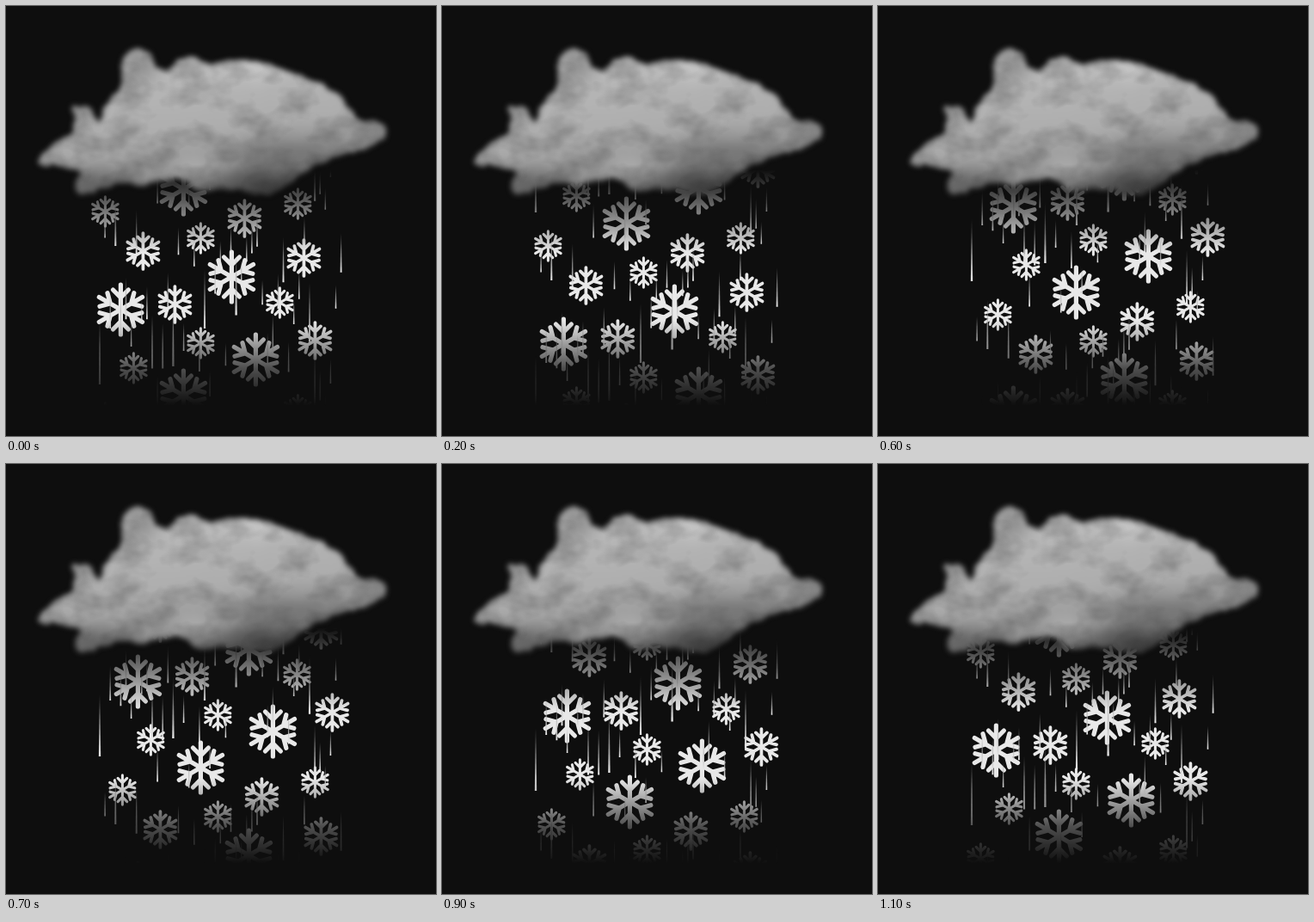
Write an HTML page that moves like this. It is 500 px wide and 500 px high and loops after 1200 ms.

```html
<!DOCTYPE html>
<html lang="en">
<head>
<meta charset="utf-8">
<title>Snow cloud</title>
<style>
html, body { margin: 0; width: 100%; height: 100%; overflow: hidden; background: #0e0e0e; }
svg { display: block; width: 500px; height: 500px; }
</style>
</head>
<body>
<svg viewBox="0 0 500 500">
  <defs>
    <linearGradient id="fade" gradientUnits="userSpaceOnUse" x1="0" y1="190" x2="0" y2="465">
      <stop offset="0" stop-color="#fff" stop-opacity="0"/>
      <stop offset=".1" stop-color="#fff" stop-opacity=".26"/>
      <stop offset=".35" stop-color="#fff"/>
      <stop offset=".64" stop-color="#fff"/>
      <stop offset=".84" stop-color="#fff" stop-opacity=".3"/>
      <stop offset="1" stop-color="#fff" stop-opacity="0"/>
    </linearGradient>
    <mask id="window" maskUnits="userSpaceOnUse" x="0" y="0" width="500" height="500">
      <rect y="190" width="500" height="275" fill="url(#fade)"/>
    </mask>
    <linearGradient id="streak" x1="0" y1="0" x2="0" y2="1">
      <stop offset="0" stop-color="#999" stop-opacity="0"/>
      <stop offset=".4" stop-color="#aaa" stop-opacity=".65"/>
      <stop offset="1" stop-color="#eee"/>
    </linearGradient>
    <linearGradient id="shade" gradientUnits="userSpaceOnUse" x1="235" y1="60" x2="255" y2="222">
      <stop offset="0" stop-color="#bababa"/>
      <stop offset=".5" stop-color="#adadad"/>
      <stop offset=".78" stop-color="#929292"/>
      <stop offset="1" stop-color="#4c4c4c"/>
    </linearGradient>
    <path id="arm" d="M0 0V-29M-9-23L0-14L9-23"/>
    <g id="flake" fill="none" stroke="#e8e8e8" stroke-width="5.2" stroke-linecap="round"></g>
    <filter id="soft" x="-60%" y="-60%" width="220%" height="220%">
      <feGaussianBlur stdDeviation="9"/>
    </filter>
    <filter id="wisp" filterUnits="userSpaceOnUse" x="10" y="30" width="460" height="220" color-interpolation-filters="sRGB">
      <feTurbulence type="fractalNoise" baseFrequency=".06" numOctaves="3" seed="4" result="noise"/>
      <feDisplacementMap in="SourceGraphic" in2="noise" scale="10" xChannelSelector="R" yChannelSelector="G"/>
      <feGaussianBlur stdDeviation="3" result="body"/>
      <feTurbulence type="fractalNoise" baseFrequency=".025 .035" numOctaves="3" seed="9"/>
      <feColorMatrix values="0 0 0 0 .05  0 0 0 0 .05  0 0 0 0 .05  .5 0 0 0 -.2"/>
      <feComposite in2="body" operator="in" result="grain"/>
      <feMerge><feMergeNode in="body"/><feMergeNode in="grain"/></feMerge>
    </filter>
    <clipPath id="outline"><path id="edge"/></clipPath>
  </defs>
  <g mask="url(#window)">
    <g id="snow"></g>
    <g id="rain" fill="url(#streak)"></g>
  </g>
  <g filter="url(#wisp)">
    <g id="cloud" clip-path="url(#outline)">
      <rect width="500" height="250" fill="url(#shade)"/>
    </g>
  </g>
</svg>
<script>
const PERIOD = 240, LOOP = 1200, STEP = 100;
const $ = id => document.getElementById(id);
const add = (id, markup) => $(id).insertAdjacentHTML('beforeend', markup);

// Closed curve through the midpoints of its control points
function smooth(points) {
  const mid = i => {
    const [a, b] = points[i], [c, d] = points[(i + 1) % points.length];
    return `${(a + c) / 2} ${(b + d) / 2}`;
  };
  return `M${mid(points.length - 1)}` + points.map((p, i) => `Q${p} ${mid(i)}`).join('') + 'Z';
}

// Cloud outline, clockwise from the left tip
const outline = `28,182 62,158 84,142 74,118 98,114 106,142 120,104 138,96 132,54 168,46 176,82
  208,56 236,70 278,58 340,80 388,100 408,136 434,132 447,148 420,168 396,168 350,190
  310,222 260,212 225,216 200,196 165,210 130,204 85,224 78,204 92,192 60,186`;
$('edge').setAttribute('d', smooth(outline.trim().split(/\s+/).map(p => p.split(',').map(Number))));

// Light and dark patches: x, y, rx, ry, grey
[
  [270, 72, 60, 12, 205], [155, 68, 20, 20, 125], [217, 190, 20, 14, 185],
  [330, 172, 60, 16, 105], [300, 206, 45, 14, 70], [425, 148, 22, 16, 120],
  [100, 206, 40, 12, 70], [88, 122, 16, 12, 100]
].forEach(([x, y, rx, ry, g]) => add('cloud',
  `<ellipse cx="${x}" cy="${y}" rx="${rx}" ry="${ry}" fill="rgb(${g},${g},${g})" opacity=".7" filter="url(#soft)"/>`));

for (let a = 0; a < 360; a += 60) add('flake', `<use href="#arm" transform="rotate(${a})"/>`);

// Each falling piece repeats above and below so the loop has no gap
const tile = (id, draw) => [-PERIOD, 0, PERIOD].forEach(dy => add(id, draw(dy)));

const flakes = [
  [1, [[134, 353], [207, 213], [263, 315], [291, 411]]],
  [.72, [[160, 285], [197, 347], [278, 247], [347, 293], [360, 389]]],
  [.59, [[116, 239], [227, 270], [340, 230], [319, 345], [227, 392], [149, 421]]]
];
for (const [size, spots] of flakes)
  for (const [x, y] of spots)
    tile('snow', dy => `<use href="#flake" transform="translate(${x - .6} ${y + dy}) scale(${size})"/>`);

let seed = 7;
const random = () => (seed = seed * 16807 % 2147483647) / 2147483647;

// Evenly spread streaks with random heights; the longer ones are wider
for (let x = 109; x <= 391; x += 6.1) {
  const y = 200 + PERIOD * random();
  const len = 26 + 56 * random() ** 2;
  const w = .6 + len / 130;
  tile('rain', dy => `<path d="M${x - .4} ${y + dy - len}h.8L${x + w} ${y + dy}h${-2 * w}z"/>`);
}

function frame(now) {
  const step = Math.floor(now % LOOP / STEP);
  const fall = step * 20;
  const drift = 4 * (6 - Math.abs(6 - step));
  $('snow').setAttribute('transform', `translate(${drift} ${fall})`);
  $('rain').setAttribute('transform', `translate(0 ${fall})`);
}

const start = performance.now();
(function tick() {
  frame(performance.now() - start);
  requestAnimationFrame(tick);
})();
</script>
</body>
</html>
```
